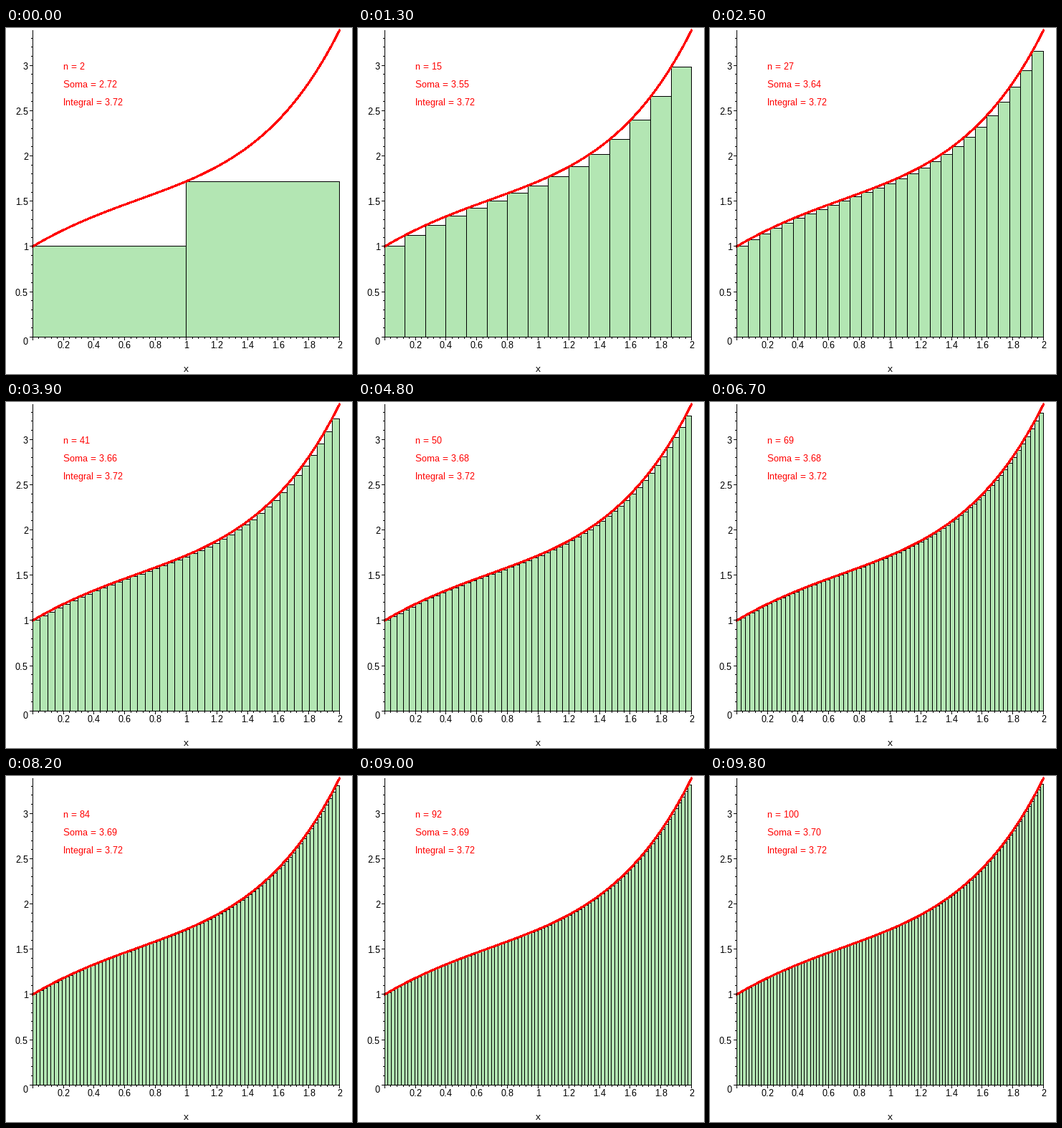
A matplotlib script for the animation above (9900 ms loop, 483 by 483 pixels).

```python
import numpy as np
import matplotlib.pyplot as plt
from matplotlib.animation import FuncAnimation
from matplotlib.collections import LineCollection, PolyCollection

plt.rcParams.update({
    "font.family": "Liberation Sans",
    "text.hinting": "native",
    "text.hinting_factor": 1,
    "text.kerning_factor": 6,
    "toolbar": "None",
})

SIZE, DPI = 483, 100
PX = 72 / DPI                      # one pixel in points
LEFT, RIGHT = 37.335, 465.635
TOP, BOTTOM = 3.024, 431.2705
X_MAX = 2
FIRST_N, LAST_N = 2, 100
GREEN = (0.7, 0.9, 0.7)


def f(x):
    return np.exp(x) - x**2


X_SCALE = (RIGHT - LEFT) / X_MAX
Y_SCALE = (BOTTOM - TOP) / f(X_MAX)


def to_x(x):
    return LEFT + X_SCALE * np.asarray(x, float)


def to_y(y):
    return BOTTOM - Y_SCALE * np.asarray(y, float)


def cell(v):
    """Centre of the pixel that holds v."""
    return np.floor(v) + 0.5


def sig3(v):
    return float(f"{v:.3g}")


def left_sum(n):
    # Every step is rounded to three significant digits.
    heights = f(np.arange(n) * X_MAX / n).sum()
    return sig3(sig3(X_MAX / n) * sig3(heights))


def bars(n):
    edges = np.linspace(0, X_MAX, n + 1)
    xs, tops = cell(to_x(edges)), cell(to_y(f(edges[:-1])))
    base = cell(BOTTOM)
    return [[(a, base), (a, t), (b, t), (b, base)]
            for a, b, t in zip(xs[:-1], xs[1:], tops)]


fig = plt.figure(figsize=(SIZE / DPI, SIZE / DPI), dpi=DPI, facecolor="white")
ax = fig.add_axes([0, 0, 1, 1])
ax.set_xlim(0, SIZE)
ax.set_ylim(SIZE, 0)
ax.axis("off")


def label(x, baseline, text, ha="left", color="black"):
    return ax.text(x, baseline, text, ha=ha, va="baseline", color=color,
                   fontsize=13 * PX)


def draw_axes():
    x0, y0 = cell(LEFT), cell(BOTTOM)
    x1, y1 = cell(RIGHT), cell(TOP)
    lines = [[(x0, y1 - 0.5), (x0, y0 + 0.5)], [(x0 - 0.5, y0), (x1 + 0.5, y0)]]
    for i in range(51):
        x = cell(to_x(i * 0.04))
        length = 4 if i % 5 == 0 else 2
        lines.append([(x, y0), (x, y0 + length + 0.5)])
    for i in range(34):
        y = cell(to_y(i * 0.1))
        length = 4 if i % 5 == 0 else 2
        lines.append([(x0 - length - 0.5, y), (x0, y)])
    ax.add_collection(LineCollection(lines, colors="black", linewidths=PX,
                                     antialiaseds=False, snap=False, zorder=4))

    for i in range(1, 11):
        label(to_x(i * 0.2), 447, f"{i * 0.2:g}", "center")
    for i in range(1, 7):
        label(31, np.floor(to_y(i * 0.5)) + 6, f"{i * 0.5:g}", "right")
    label(31, 442, "0", "right")
    label(to_x(1), 480, "x", "center")


draw_axes()

boxes = PolyCollection(bars(FIRST_N), facecolors=[GREEN], edgecolors="black",
                       linewidths=PX, antialiaseds=False, snap=False, zorder=1)
ax.add_collection(boxes)

curve_x = np.linspace(0, X_MAX, 200)
ax.plot(to_x(curve_x), to_y(f(curve_x)), color="red", linewidth=2 * PX,
        antialiased=False, snap=False, zorder=3)

n_text = label(80, 58, "", color="red")
sum_text = label(80, 83, "", color="red")
integral = np.exp(X_MAX) - 1 - X_MAX**3 / 3
label(80, 108, f"Integral = {integral:.2f}", color="red")


def update(frame):
    n = FIRST_N + frame
    boxes.set_verts(bars(n))
    n_text.set_text(f"n = {n}")
    sum_text.set_text(f"Soma = {left_sum(n):.2f}")
    return boxes, n_text, sum_text


anim = FuncAnimation(fig, update, frames=LAST_N - FIRST_N + 1, interval=100,
                     repeat=True, repeat_delay=0, blit=False)
plt.show()
```
